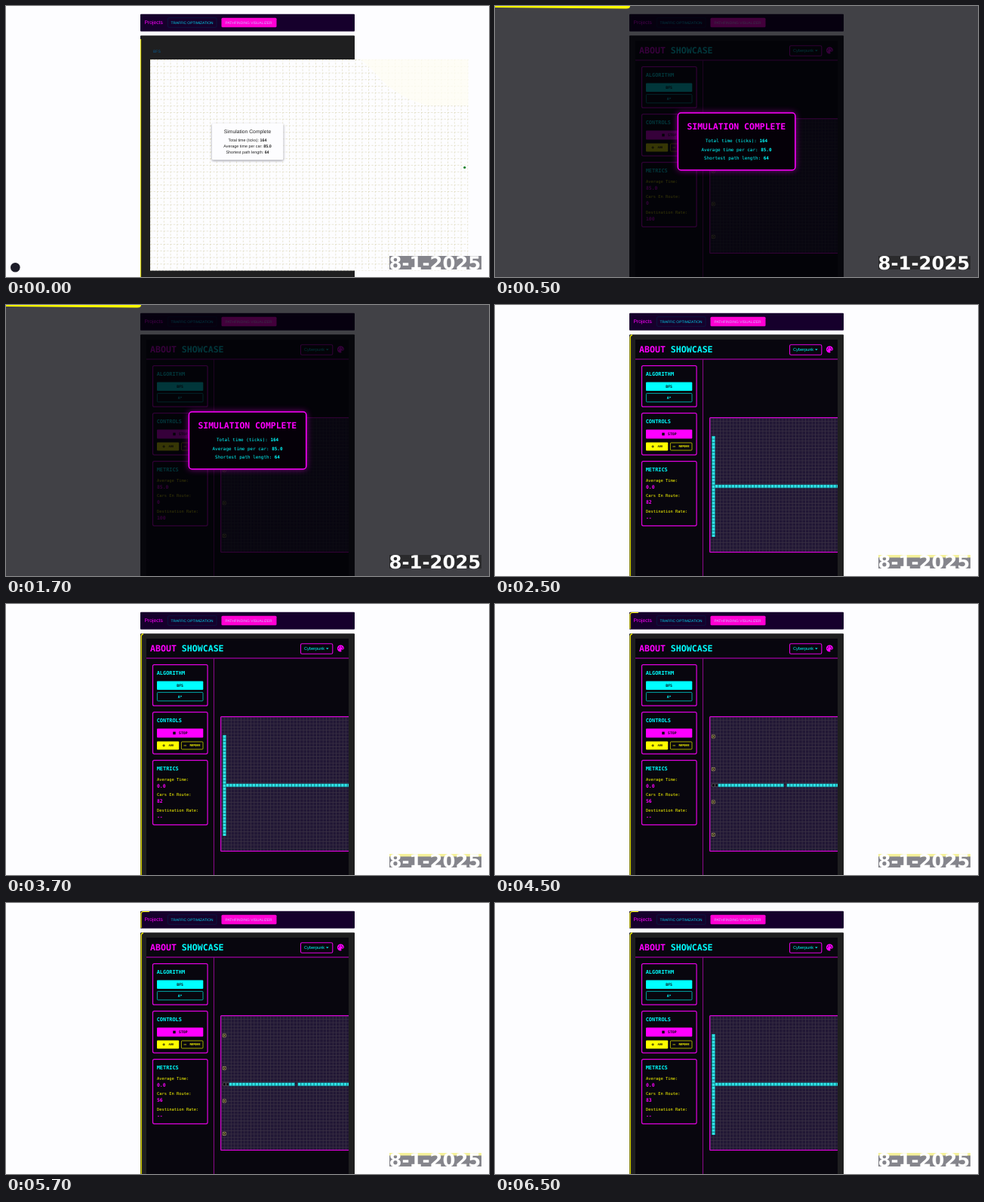
An HTML page that plays this animation: 640 by 360 pixels, repeating every 8000 ms.

```html
<!DOCTYPE html>
<html lang="en">
<head>
<meta charset="utf-8">
<title>Pathfinding dashboard</title>
<style>
html, body { margin: 0; width: 100%; height: 100%; overflow: hidden; background: #fdfdff; }
svg { display: block; width: 100vw; height: 100vh; }
text { font-family: "Liberation Sans", Arial, sans-serif; text-rendering: geometricPrecision; white-space: pre; }
.mono text { font-family: "DejaVu Sans Mono", monospace; }
.b { font-weight: bold; }
.mid { text-anchor: middle; }
.date { font: bold 24.3px "DejaVu Sans", sans-serif; }
.pink { fill: #f0f; }
.cyan { fill: #0ff; }
.yellow { fill: #ff0; }
.card rect { fill: #08060e; stroke: #e000e0; stroke-width: 1.2; }
</style>
</head>
<body>
<svg viewBox="0 0 640 360">
  <defs>
    <pattern id="cells" x="284.9" y="149.9" width="4.35" height="4.35" patternUnits="userSpaceOnUse">
      <rect width="4.35" height="4.35" fill="#211735"/>
      <path d="M0 .4H4.35M.4 0V4.35" stroke="#393043" stroke-width=".8"/>
    </pattern>
    <pattern id="sheet" x="191.3" y="71" width="8.75" height="8.75" patternUnits="userSpaceOnUse">
      <path d="M0 .5H8.75M.5 0V8.75" stroke="#dedac0" stroke-width=".8" stroke-dasharray="2.2 2.175"/>
    </pattern>
    <filter id="glow" x="-20%" y="-30%" width="140%" height="160%"><feGaussianBlur stdDeviation="4"/></filter>
    <filter id="soft" x="-20%" y="-30%" width="140%" height="160%"><feGaussianBlur stdDeviation="1.6"/></filter>
    <clipPath id="view"><rect x="186" y="46" width="268" height="314"/></clipPath>
  </defs>

  <rect width="640" height="360" fill="#fdfdff"/>

  <!-- navigation -->
  <rect x="178" y="10.8" width="284" height="23" rx="1" fill="#16002c"/>
  <path data-on="3 4" d="M179 33V14Q179 11.5 182 11.5H190" fill="none" stroke="#ff0" stroke-width="1.2"/>
  <text class="pink" x="183.4" y="24.4" font-size="6.75">Projects</text>
  <rect x="214.5" y="15.7" width="64.5" height="12.6" rx="1.5" fill="none" stroke="#06264a" stroke-width=".6"/>
  <text x="218.5" y="23.8" font-size="4.87" fill="#00d8f0">TRAFFIC OPTIMIZATION</text>
  <rect x="285.5" y="15.7" width="73" height="12.6" rx="1.5" fill="#ff00d4"/>
  <text x="290.5" y="23.8" font-size="4.88" fill="#d2b4ff">PATHFINDING VISUALIZER</text>

  <!-- panel -->
  <rect x="178" y="39.2" width="284" height="324" rx="1" fill="#1f1f20"/>
  <path data-on="0" d="M178.6 360V44" stroke="#e8e400"/>
  <path data-on="2 3 4" d="M179.2 360V43Q179.2 40 182 39.8" fill="none" stroke="#f4f000" stroke-width="1.3"/>

  <g data-on="0">
    <text x="195" y="62" font-size="5" fill="#0a5688">BFS</text>
    <rect x="191" y="71" width="421.5" height="280.5" fill="#fdfdff"/>
    <rect x="191" y="71" width="421.5" height="280.5" fill="url(#sheet)"/>
    <path d="M470 71H612.5V132H556L530 122L505 106L488 88Z" fill="#fffef4" opacity=".8"/>
    <circle cx="607.7" cy="214.5" r="1.6" fill="#087c1c"/>
    <rect x="273" y="157.5" width="94.5" height="48" rx="1.5" fill="#445" opacity=".6" filter="url(#soft)"/>
    <rect x="273" y="156" width="94.5" height="48.5" rx="1.5" fill="#fdfdff"/>
    <g class="mid" fill="#222" font-size="5.4">
      <text x="320" y="169.3" font-size="6.75">Simulation Complete</text>
      <text x="320" y="180.2">Total time (ticks): <tspan class="b">164</tspan></text>
      <text x="320" y="188.2">Average time per car: <tspan class="b">85.0</tspan></text>
      <text x="320" y="196.2">Shortest path length: <tspan class="b">64</tspan></text>
    </g>
    <circle cx="12.3" cy="347.3" r="6.3" fill="#1c1c28"/>
  </g>

  <g class="mono" data-on="1 2 3 4">
    <rect x="186" y="46" width="268" height="314" fill="#08060e"/>
    <text class="b pink" x="191" y="63.2" font-size="11.58">ABOUT <tspan class="cyan">SHOWCASE</tspan></text>
    <rect x="390.5" y="52.7" width="42.3" height="13.6" rx="1.8" fill="#08060e" stroke="#e000e0" stroke-width="1.1"/>
    <text class="cyan" x="395" y="61.3" font-size="5.6" style="font-family:'Liberation Sans',sans-serif">Cyberpunk</text>
    <path class="cyan" d="M424 58.4h3.6l-1.8 1.9z"/>
    <path class="pink" d="M443.4 54.5a4.5 4.5 0 1 0 0 9c1.2 0 1.4-.9.9-1.5c-.5-.7 0-1.4.8-1.4h1c1 0 1.8-.8 1.8-1.9c0-2.4-2-4.2-4.5-4.2z"/>
    <g fill="#150024"><circle cx="440.8" cy="59" r=".75"/><circle cx="442.1" cy="56.9" r=".75"/><circle cx="444.7" cy="56.9" r=".75"/><circle cx="446.1" cy="58.8" r=".75"/></g>
    <path d="M186 72H454" stroke="#c800c8"/>
    <path d="M275.5 72V360" stroke="#8c0a8c"/>

    <g class="card">
      <rect x="194.5" y="80.6" width="72.6" height="54.6" rx="2"/>
      <rect x="194.5" y="143.7" width="72.6" height="55.4" rx="2"/>
      <rect x="194.5" y="207.7" width="72.6" height="85.6" rx="2"/>
    </g>
    <g class="b cyan" font-size="6.9">
      <text x="199.7" y="94.2">ALGORITHM</text>
      <text x="199.7" y="157.2">CONTROLS</text>
      <text x="199.7" y="221.2">METRICS</text>
    </g>
    <rect class="cyan" x="200" y="102.5" width="61.3" height="11.6" rx="1"/>
    <rect x="200.4" y="117.4" width="60.6" height="11.4" rx="1" fill="none" stroke="#0cc" stroke-width=".8"/>
    <rect class="pink" x="200" y="165.6" width="61.3" height="11.8" rx="1"/>
    <rect class="yellow" x="200" y="182.6" width="29.2" height="10.8" rx="1"/>
    <rect x="232.4" y="183" width="28.6" height="10" rx="1" fill="none" stroke="#cc0" stroke-width=".8"/>
    <g class="b" fill="#08060e" font-size="4.8">
      <text class="mid" x="230.6" y="110">BFS</text>
      <text class="mid cyan" x="230.6" y="124.8">A*</text>
      <rect x="221.3" y="169.7" width="3.4" height="3.6"/>
      <text x="229" y="173.2">STOP</text>
      <path d="M207.4 188h3.4m-1.7-1.7v3.4" stroke="#08060e" stroke-width=".8"/>
      <text x="215.5" y="189.3" font-size="3.7">ADD</text>
      <path d="M235.5 188h3.6" stroke="#ff0" stroke-width=".7"/>
      <text class="yellow" x="243.5" y="189.3" font-size="3.9">REMOVE</text>
    </g>
    <g class="yellow" font-size="5.4">
      <text x="200" y="235">Average Time:</text>
      <text x="200" y="255.3">Cars En Route:</text>
      <text x="200" y="275.6">Destination Rate:</text>
    </g>
    <g class="b pink" font-size="6.4">
      <text id="avg" x="200" y="244"></text>
      <text id="cars" x="200" y="264.3"></text>
      <text id="rate" x="200" y="284.6"></text>
    </g>

    <g clip-path="url(#view)">
      <rect x="284.6" y="149.6" width="180" height="178.8" rx="1" fill="url(#cells)" stroke="#d000d0" stroke-width="1.2"/>
      <g id="nodes" data-on="1 3"></g>
      <g fill="none" stroke="#147f89" stroke-width="4.8">
        <path data-on="2 4" d="M289.5 174V308M292 240.8H454"/>
        <path data-on="3" d="M295.5 240.8H383M386.5 240.8H454"/>
        <g stroke="#2fe4e8" stroke-width="3.4" stroke-dasharray="3.2 1.15">
          <path data-on="2 4" d="M289.5 174.5V308M292 240.8H454"/>
          <path data-on="3" d="M296 240.8H383M387 240.8H454"/>
        </g>
      </g>
      <path data-on="3" d="M287.5 238.8h3.6v4h-3.6zM291.8 238.8h3.2v4h-3.2z" fill="#08060e" stroke="#777" stroke-width=".5"/>
    </g>
  </g>

  <!-- result dialog -->
  <g class="mono" data-on="1">
    <rect width="640" height="360" fill="#000006" opacity=".74"/>
    <rect x="178" y="39.2" width="284" height="321" fill="#06060c" opacity=".2"/>
    <path class="yellow" d="M0 0H179Q179 3.5 174 3.5L0 2Z"/>
    <rect x="242" y="142" width="156" height="76" rx="4" fill="#d0d" opacity=".65" filter="url(#glow)"/>
    <rect x="242.4" y="142" width="155.4" height="76" rx="4" fill="#050008" stroke="#f0f" stroke-width="1.5"/>
    <text class="b mid pink" x="319.8" y="163.8" font-size="11.45">SIMULATION COMPLETE</text>
    <g class="cyan mid" font-size="5.95">
      <text x="320" y="181.4">Total time (ticks): <tspan class="b">164</tspan></text>
      <text x="320" y="192.9">Average time per car: <tspan class="b">85.0</tspan></text>
      <text x="320" y="204.3">Shortest path length: <tspan class="b">64</tspan></text>
    </g>
  </g>

  <!-- date stamp -->
  <rect data-on="0 2 3 4" x="508" y="332" width="122" height="18" fill="#85858c"/>
  <rect data-on="1" x="508" y="332" width="122" height="18" fill="#2a2a2c"/>
  <rect data-on="2 3 4" x="508" y="332" width="122" height="3.5" fill="#f5f19a"/>
  <text class="date" x="507.6" y="350" fill="#fff">8-1-2025</text>
</svg>
<script>
const $ = id => document.getElementById(id);
const starts = [0, 500, 2500, 4500, 6500], loop = 8000;
const metrics = [
  ["", "", ""], ["85.0", "0", "100"], ["0.0", "82", "--"], ["0.0", "56", "--"], ["0.0", "83", "--"]
];
const parts = [...document.querySelectorAll("[data-on]")];
let shown = -1;

$("nodes").innerHTML = [0, 1, 2, 3].map(i => {
  const y = 174 + i * 43.5;
  return `<rect x="287.4" y="${y}" width="3.8" height="4" fill="#08060e" stroke="#b5a968" stroke-width=".7"/>
    <rect x="288.7" y="${y + 1.3}" width="1.3" height="1.4" fill="#e5d65c"/>`;
}).join("");

function show(scene) {
  for (const p of parts) p.style.display = p.dataset.on.includes(scene) ? "" : "none";
  ["avg", "cars", "rate"].forEach((id, i) => $(id).textContent = metrics[scene][i]);
  shown = scene;
}

function tick() {
  const t = performance.now() % loop;
  const scene = starts.filter(s => s <= t).length - 1;
  if (scene !== shown) show(scene);
  requestAnimationFrame(tick);
}
tick();
</script>
</body>
</html>
```
